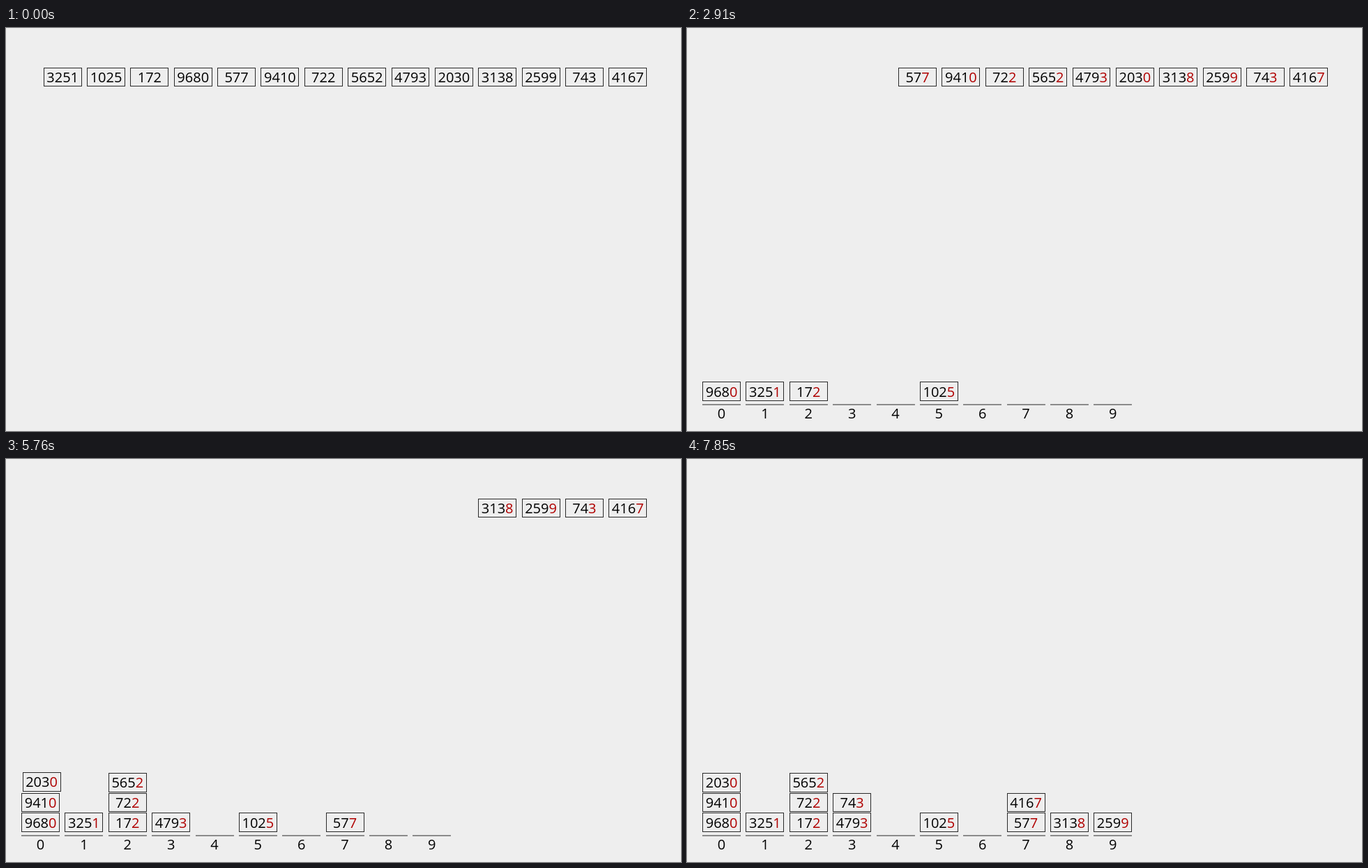
Animation, 968 px wide and 579 px high, one loop 8000 ms. Source, as an HTML page with a canvas:

```html
<!DOCTYPE html>
<html lang="en">
<head>
<meta charset="utf-8">
<title>Radix sort: last digit pass</title>
<style>
  html, body { margin: 0; width: 100%; height: 100%; overflow: hidden; background: #eee; }
  canvas { display: block; }
</style>
</head>
<body>
<canvas id="stage" width="968" height="579"></canvas>
<script>
const ctx = document.getElementById('stage').getContext('2d');
const LOOP = 8000, SORT_START = 671, TICK = 77.1;            // ms
const FIRST_FLIGHT = 1141, INTERVAL = 491.3, FLIGHT = 227;   // ms
const PITCH = 62.35, BOX_W = 53.95, BOX_H = 26.6;
const ROW = { x: 53.7, y: 56.6 }, BIN = { x: 22.1, y: 508.4, step: 28.7 };
const INK = '#000', LINE = '#2a2a2a', RED = '#b00000';

const values = [3251, 1025, 172, 9680, 577, 9410, 722, 5652, 4793, 2030, 3138, 2599, 743, 4167];
const filled = Array(10).fill(0);
const items = values.map((value, i) => {
  const digit = value % 10;
  return {
    text: String(value),
    from: { x: ROW.x + PITCH * i, y: ROW.y },
    to: { x: BIN.x + PITCH * digit, y: BIN.y - BIN.step * filled[digit]++ },
    start: FIRST_FLIGHT + INTERVAL * i,
  };
});

const clamp = u => Math.min(1, Math.max(0, u));
const easeInOut = u => u < 0.5 ? 8 * u ** 4 : 1 - 8 * (1 - u) ** 4;
const mix = (a, b, p) => a + (b - a) * p;

function write(text, x, y, color) {
  ctx.fillStyle = color;
  ctx.fillText(text, x, y);
}

const centeredLeft = (text, x) => x + (BOX_W + 1 - ctx.measureText(text).width) / 2;

function drawBox(x, y) {
  const left = Math.round(x), top = Math.round(y);
  ctx.strokeRect(left + 0.5, top + 0.5, Math.round(x + BOX_W) - left, Math.round(y + BOX_H) - top);
}

function drawItem({ text, from, to, start }, time) {
  const p = easeInOut(clamp((time - start) / FLIGHT));
  const x = mix(from.x, to.x, p), y = mix(from.y, to.y, p);
  drawBox(x, y);

  const head = text.slice(0, -1), left = centeredLeft(text, x), baseline = Math.round(y + 21.2);
  write(head, left, baseline, INK);
  write(text.slice(-1), left + ctx.measureText(head).width, baseline, time < SORT_START ? INK : RED);
}

function drawBins() {
  for (let digit = 0; digit < 10; digit++) {
    const x = BIN.x + PITCH * digit;
    ctx.fillStyle = LINE;
    ctx.fillRect(Math.round(x), 540.6, BOX_W + 1, 1);
    write(digit, centeredLeft(digit, x), 561, INK);
  }
}

function render(now) {
  // The picture is held for one tick at a time
  const time = SORT_START + Math.floor((now % LOOP - SORT_START) / TICK) * TICK;
  ctx.fillStyle = '#eee';
  ctx.fillRect(0, 0, 968, 579);
  ctx.font = '20px "Open Sans", "Noto Sans", sans-serif';
  ctx.strokeStyle = LINE;
  if (time >= SORT_START) drawBins();
  items.forEach(item => drawItem(item, time));
  requestAnimationFrame(render);
}
requestAnimationFrame(render);
</script>
</body>
</html>
```
